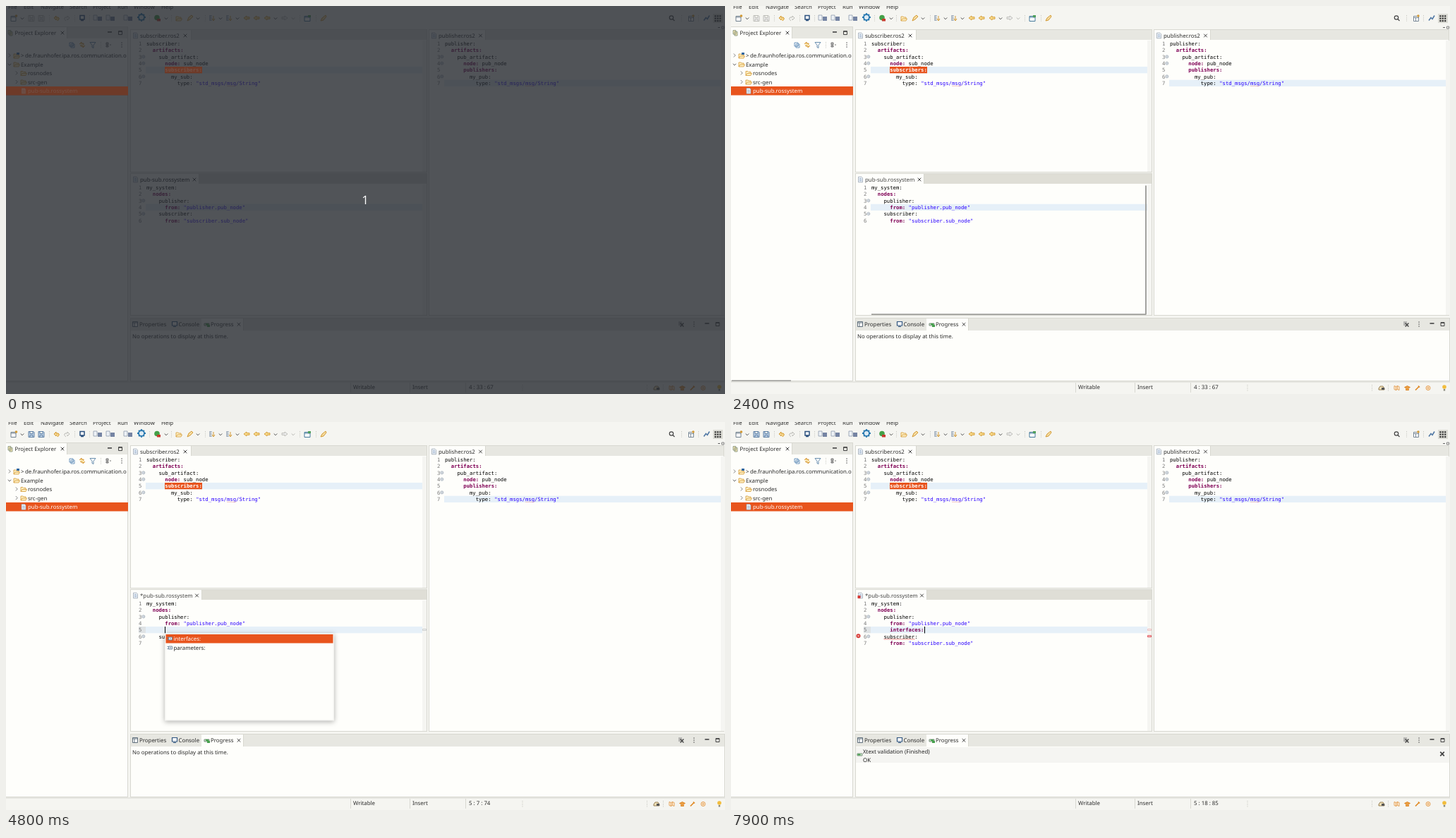
An HTML page with a canvas for the animation above (8 s loop, 1019 by 550 pixels).

```html
<!DOCTYPE html>
<html lang="en">
<head>
<meta charset="utf-8">
<title>Editor demo</title>
<style>
html, body { margin: 0; width: 100%; height: 100%; overflow: hidden; background: #f6f6f2; }
canvas { display: block; }
</style>
</head>
<body>
<canvas id="stage" width="1019" height="550"></canvas>
<script>
const ctx = document.getElementById('stage').getContext('2d');
const LOOP = 8000, CW = 4.385, LH = 9.33;
const UI = '7.87px "Noto Sans", "Open Sans", sans-serif';
const MONO = '7.285px "DejaVu Sans Mono", monospace';
const ORANGE = '#e8541d', PAPER = '#fefefb', BAR = '#f5f5f1', STRIP = '#e7e7e1';
const EDGE = '#d8d8d1', INK = '#2a2a2a', GOLD = '#d39a35', GREY = '#b9b9b4';
const HILITE = '#e6f0f8';
const KEYWORDS = /("[^"]*"|\b(?:artifacts|node|nodes|subscribers|publishers|from|interfaces):)/;

const artifact = (role, short) => [
  `${role}:`, '  artifacts:', `    ${short}_artifact:`, `      node: ${short}_node`,
  `      ${role}s:`, `        my_${short}:`, '          type: "std_msgs/msg/String"'];
const SUBSCRIBER = artifact('subscriber', 'sub');
const PUBLISHER = artifact('publisher', 'pub');
const SYSTEM = ['my_system:', '  nodes:', '    publisher:', '      from: "publisher.pub_node"',
  '    subscriber:', '      from: "subscriber.sub_node"'];

function rect(x, y, w, h, color) {
  ctx.fillStyle = color;
  ctx.fillRect(x, y, w, h);
}
function text(s, x, y, color = INK, font = UI, align = 'left') {
  ctx.font = font;
  ctx.fillStyle = color;
  ctx.textAlign = align;
  ctx.fillText(s, x, y);
}
// Path in coordinates relative to (x, y); stroked, and filled if a fill is given.
function icon(d, x, y, color = INK, fill, width = 1) {
  const p = new Path2D(d);
  ctx.save();
  ctx.translate(x, y);
  if (fill) { ctx.fillStyle = fill; ctx.fill(p); }
  ctx.strokeStyle = color;
  ctx.lineWidth = width;
  ctx.stroke(p);
  ctx.restore();
}
function disc(x, y, r, color) {
  ctx.fillStyle = color;
  ctx.beginPath();
  ctx.arc(x, y, r, 0, 7);
  ctx.fill();
}
const close = (x, y, r = 2.3, w = 1) =>
  icon(`M${-r} ${-r}L${r} ${r}M${r} ${-r}L${-r} ${r}`, x, y, '#444', null, w);
const chevron = (x, y, c = '#555') => icon('M-2.3-1L0 1.3L2.3-1', x, y, c);
const folder = (x, y) => icon('M-4 3V-3H-1L0-2H3V0M-4 3L-2 0H4.5L3 3Z', x, y, GOLD, '#fff0c4', .8);
const page = (x, y) => {
  icon('M-3-3.8H1.5L3-2.3V3.8H-3Z', x, y, '#8d9bab', '#f4f7fb', .7);
  icon('M-1.7-1.4H1.5M-1.7 .2H1.8M-1.7 1.8H1.8', x, y, '#6f8fb5', null, .6);
};
const dots = (x, y) => { for (const d of [-3, 0, 3]) rect(x - .6, y + d - .6, 1.3, 1.3, '#555'); };
const separator = (x, y) => { for (let i = -4; i < 5; i += 2.5) rect(x, y + i, 1, 1, '#c3c3bd'); };
const windowButtons = (x, y, gap) => {
  rect(x - 3, y - 2, 6, 1.8, '#555');
  icon('M-2.5-2.5H2.5V2.5H-2.5ZM-2.5-1.7H2.5', x + gap, y, '#444');
};
const arrow = (x, y, dir, c, fill) =>
  icon(`M${-4 * dir} 0L0-3V-1.3H${4 * dir}V1.3H0V3Z`, x, y, c, fill, .9);
const disk = (x, active) =>
  icon('M-4-4H3L4-3V4H-4ZM-2-4V-1H2V-4M-2 4V1H2V4', x, 17.5, active ? '#54789f' : GREY, active ? '#c5d7ea' : '#eee', .9);

function frame(x, y, w, h, stripH, tabX, tabW, strip = STRIP) {
  rect(x, y, w, h, PAPER);
  rect(x, y, w, stripH, strip);
  rect(tabX, y, tabW, stripH + 1, PAPER);
  ctx.strokeStyle = EDGE;
  ctx.lineWidth = 1;
  ctx.strokeRect(x - .5, y - .5, w, h);
  rect(tabX + tabW, y, 1, stripH, EDGE);
}

function toolbar(dirty) {
  rect(0, 0, 1019, 29, BAR);
  [['File', 3], ['Edit', 25], ['Navigate', 49], ['Search', 90], ['Project', 123], ['Run', 158],
    ['Window', 181], ['Help', 220]].forEach(([s, x]) => text(s, x, 4.2));
  icon('M-4-3H3V4H-4ZM-4-1.5H3', 11, 17.5, '#6f7f8d', '#fff');
  disc(14.5, 14, 1.8, GOLD);
  disk(36, dirty);
  disk(50, dirty);
  icon('M-4 0L-1-3V-1H2Q5 1 1 4M-4 0L-1 3V1', 72, 17, GOLD, '#f4d387');
  icon('M4 0L1-3V-1H-2Q-5 1-1 4M4 0L1 3V1', 86, 17, GREY);
  icon('M-3-3.5H3V2H-3ZM-2 3.5H2', 108, 17, '#2d527f', '#fff', 1.5);
  for (const x of [127, 145, 170]) icon('M-3-4H2V3H-3Z', x, 17, '#8d9bab', '#eef2f7', .8);
  for (const x of [131, 149, 174]) rect(x - 1, 15, 6, 6, '#7584a3');
  icon('M-4 0H-6M4 0H6M0-4V-6M0 4V6M-3-3L-4-4M3-3L4-4M-3 3L-4 4M3 3L4 4M-4 0A4 4 0 1 0 4 0A4 4 0 1 0-4 0',
    192, 16, '#2878b0', '#dceaf3', 1.8);
  disc(214, 16.5, 3.8, '#44a048');
  rect(214, 18, 5, 3.5, '#c8382c');
  folder(245, 18);
  icon('M-4 4L-2-1L2-4L4-2L0 2Z', 261, 17, GOLD, '#f5dca0');
  for (const x of [292, 316]) {
    icon('M-3-4V4M-3-3H0M-3 0H0M-3 3H0', x, 17, '#7e91a8');
    icon('M2-3V3M0 1L2 4L4 1', x, 17, GOLD);
  }
  arrow(341, 17, 1, GOLD, '#f9dc8c');
  arrow(355, 17, 1, GOLD, '#f9dc8c');
  arrow(370, 17, 1, GOLD, '#f9dc8c');
  arrow(395, 17, -1, GREY, '#eee');
  icon('M-4-3H4V4H-4ZM-4-1.5H4', 427, 17.5, '#45799a', '#fff');
  rect(428, 13, 4, 3, '#50a05b');
  icon('M-4 4L-2 0L3-4L4-2L0 3Z', 450, 17, GOLD, '#f5dca0');
  for (const x of [23, 227, 272, 304, 328, 382]) chevron(x, 17.5);
  chevron(407, 17.5, GREY);
  for (const x of [61, 97, 118, 203, 234, 282, 416, 439, 957, 981]) separator(x, 17);
  icon('M2.2 0A2.7 2.7 0 1 1-3.2 0A2.7 2.7 0 1 1 2.2 0M1.5 2L4 4.5', 943.5, 16.5, '#444', null, 1.2);
  icon('M-3-3H4V4H-3ZM-3-1H4M0-1V4', 970.5, 17.5, '#6c7d8d', '#fff', .9);
  disc(974, 14, 1.7, GOLD);
  icon('M-4 3L-1-1L1 1L4-4', 993, 17.5, '#5279a5', null, 1.6);
  rect(1002, 11, 14, 13, '#dcdcd5');
  for (let i = 0; i < 9; i++) rect(1004.3 + i % 3 * 3.4, 13.2 + (i / 3 | 0) * 3.4, 2.2, 2.2, '#333');
}

function explorer() {
  frame(0, 30, 173, 502, 16, 0, 86);
  icon('M-3-3.5H1V2H-3ZM-1-1.5H3V4H-1Z', 6, 38, '#8c9a86', '#f6e4ad', .9);
  text('Project Explorer', 12.5, 40.7);
  close(80, 38);
  windowButtons(147, 38, 15);
  icon('M-3-3H2V2H-3ZM-1-1H4V4H-1ZM0 1.5H3', 93, 55, '#5b89b5', '#fff', .9);
  icon('M-4-1L-1-4V-2H2V0M4 1L1 4V2H-2V0', 108, 55, '#cf8b26', '#f9dc8c', .9);
  icon('M-4-4H4L1 0V4L-1 3V0Z', 123, 55.5, '#5a83a5', '#fff', .9);
  separator(134, 55);
  icon('M-3-3H0V0H-3ZM-3 1H0V3H-3ZM2 0H4', 145, 55, '#777', '#bbb');
  dots(164, 55);
  rect(0, 114, 173, 12.5, ORANGE);
  const side = (x, y) => icon('M-1.2-2.5L1.3 0L-1.2 2.5', x, y, '#666', null, .8);
  side(5, 70); side(15, 95); side(15, 107.6);
  chevron(5, 82.8, '#666');
  folder(15, 71); folder(15, 83); folder(25, 95.5); folder(25, 108);
  rect(15, 66, 4, 3, '#35699f');
  page(25, 120.4);
  ctx.save();
  ctx.beginPath();
  ctx.rect(0, 60, 172.5, 60);
  ctx.clip();
  text('>', 21, 73);
  text('de.fraunhofer.ipa.ros.communication.o', 27, 73);
  ctx.restore();
  text('Example', 21, 85.6);
  text('rosnodes', 31, 98.2);
  text('src-gen', 31, 110.7);
  text('pub-sub.rossystem', 31, 123.3, '#fff');
}

function codeLine(line, x, y) {
  let col = 0;
  for (const part of line.split(KEYWORDS)) {
    const quoted = part[0] === '"', key = !quoted && KEYWORDS.test(part);
    text(part, x + col * CW, y, quoted ? '#2a00ff' : key ? '#7f0055' : '#000', (key ? 'bold ' : '') + MONO);
    col += part.length;
  }
}
function squiggle(x, y, w, color = '#e0302a') {
  let d = 'M0 0';
  for (let i = 1; i <= w; i++) d += `L${i} ${i % 2 ? .9 : 0}`;
  icon(d, x, y, color, null, .6);
}
function editor(x, base, lines, folds, current, right) {
  const tx = x + 22;
  rect(tx - 1, base - 7.3 + (current - 1) * LH, right - tx + 1, LH, HILITE);
  lines.forEach((line, i) => {
    const y = base + i * LH;
    text(i + 1, x + 15.3, y, '#787878', MONO, 'right');
    if (folds.includes(i + 1)) {
      icon('M2 0A2 2 0 1 1-2 0A2 2 0 1 1 2 0M-1 0H1', x + 17.8, y - 2.8, '#8b98a6', '#f0f3f6', .7);
    }
    codeLine(line, tx, y);
  });
}

function topEditors() {
  frame(177, 34, 420, 202, 14, 177, 85);
  rect(590, 49, 6, 186, '#f5f5f2');
  page(183.5, 42);
  text('subscriber.ros2', 190, 44.8);
  close(254, 42);
  editor(177, 56, SUBSCRIBER, [3, 4, 6], 5, 590);
  rect(225, 86, 53, 9.3, ORANGE);
  text('subscribers:', 199 + 6 * CW, 56 + 4 * LH, '#fff', 'bold ' + MONO);
  squiggle(313, 113, 13, '#efa9a4');

  frame(600, 34, 418, 405, 14, 600, 79);
  rect(1013, 49, 5, 389, '#f5f5f2');
  page(606.5, 42);
  text('publisher.ros2', 613, 44.8);
  close(672.5, 42);
  editor(600, 56, PUBLISHER, [3, 4, 6], 7, 1013);
  squiggle(736, 113, 13, '#efa9a4');
  rect(1009, 30, 3, 1, '#666');
  icon('M-1.5-1.5H1.5V1.5H-1.5Z', 1016, 30.5, '#666', null, .8);
}

function systemEditor(t) {
  const dirty = t >= 4000, done = t >= 7000, error = t >= 7500;
  const lines = SYSTEM.slice();
  if (dirty) lines.splice(4, 0, done ? '      interfaces:' : '');
  frame(177, 238, 420, 201, 14, 177, dirty ? 100 : 96, '#dfded6');
  rect(590, 253, 6, 185, '#f5f5f2');
  page(183.5, 246);
  text((dirty ? '*' : '') + 'pub-sub.rossystem', 190, 248.8, t < 2400 ? '#111' : '#444');
  close(dirty ? 270.5 : 267, 246);
  if (dirty) rect(188, 290, 10, LH, '#dfe3e5');
  editor(177, 260, lines, dirty ? [3, 6] : [3, 5], dirty ? 5 : 4, 590);
  if (dirty) icon('M-2.5-1H2.5V1H-2.5Z', 593, 294.5, error ? '#efb6b6' : '#c5c8c8', '#f2f2f2', .8);
  if (error) {
    rect(179.5, 246, 4, 4, '#d63a35');
    disc(180.5, 303.3, 3, '#d63a35');
    icon('M-1.1-1.1L1.1 1.1M1.1-1.1L-1.1 1.1', 180.5, 303.3, '#fff', null, .8);
    squiggle(216.5, 307.5, 44);
    icon('M-2.5-1H2.5V1H-2.5Z', 593, 303.7, '#e04850', '#f8cfd0', .9);
  }
  const caretOn = t >= 3400 && t < 5200 || t >= 5800 && t < 6400 || done;
  if (caretOn) {
    const col = done ? 17 : dirty ? 6 : 32;
    rect(Math.round(199 + col * CW), dirty ? 290 : 280, 1, 9.5, '#000');
  }
}

function popup() {
  ctx.save();
  ctx.shadowColor = 'rgba(0,0,0,.32)';
  ctx.shadowBlur = 7;
  ctx.shadowOffsetY = 1.5;
  rect(225, 299.5, 240, 124, '#f4f4f1');
  ctx.restore();
  rect(226.5, 301, 237, 121, PAPER);
  rect(226.5, 301, 237, 12.5, ORANGE);
  ['interfaces:', 'parameters:'].forEach((s, i) => {
    const y = 307 + i * 13;
    icon('M-1.5-2H3.5V2H-1.5ZM-3.5-1.5H-1.5M-3.5 1.5H-1.5M0 0H2', 232, y, '#667f9a', '#edf2f6', .9);
    text(s, 237.5, y + 3, i ? '#222' : '#fff');
  });
}

function bottomPanel(finished) {
  frame(177, 443, 842, 89, 17, 277, 59);
  icon('M-3.5-3.5H3.5V3.5H-3.5ZM-3.5-2H3.5M-1-2V3.5', 183, 451, '#50606f', '#fff', .9);
  icon('M-3.5-3.5H3.5V2H-3.5ZM-2 3.5H2', 239, 451, '#2f547f', '#fff', 1.2);
  icon('M-4-1H3V2H-4Z', 285, 451, '#66806b', '#d7ead5', .9);
  rect(283, 450, 4, 2, '#45a04c');
  rect(285, 452, 4, 3, '#45a04c');
  text('Properties', 189, 453.8);
  text('Console', 244.5, 453.8);
  text('Progress', 290, 453.8);
  close(330, 451.3);
  icon('M-3-3H2M-3-1H2M-3 1H0', 956, 451, '#888');
  close(958, 452, 2.4, 1.4);
  dots(975, 451);
  windowButtons(993.5, 451, 15);
  if (finished) {
    rect(177, 461, 841, 22, '#f5f5f2');
    icon('M-3.5-1.5H3.5V1.5H-3.5Z', 182.5, 471.5, '#66806b', '#d7ead5', .8);
    rect(179.5, 470.5, 4, 2, '#45a04c');
    text('Xtext validation (Finished)', 187, 470.3, '#222');
    text('OK', 187, 481.5, '#222');
    close(1008, 470.5, 2.8, 1.7);
  } else {
    text('No operations to display at this time.', 179, 470.6);
  }
}

function statusBar(position) {
  rect(0, 533, 1019, 17, BAR);
  rect(0, 532.5, 1019, 1, EDGE);
  for (const x of [488, 572, 651]) rect(x, 534, 1, 14, EDGE);
  separator(731.5, 541);
  separator(908, 541);
  separator(931, 541);
  text('Writable', 492, 543.4);
  text('Insert', 576, 543.4);
  text(position, 656, 543.4);
  icon('M-4 1L-2-2H2L4 1V3H-4Z', 922, 541, '#8d7448', '#f0dfb5', .9);
  rect(922, 541, 4, 3, '#555');
  icon('M-3.5-3L-1-2L1-3L3.5-2V3L1 2L-1 3L-3.5 2ZM-1-2V3M1-3V2', 943.5, 541.5, '#dc8c36', '#fff3df', .8);
  icon('M-4-1L0-3L4-1L0 1ZM-2 1V3H2V1', 958.5, 541.5, '#dc8220', '#eca044', .9);
  icon('M-3 3L2-2M1-3L3-1', 973, 541.5, '#e08a25', null, 1.7);
  icon('M3 0A3 3 0 1 1-3 0A3 3 0 1 1 3 0M1 0A1 1 0 1 1-1 0A1 1 0 1 1 1 0', 988, 541.5, '#e29a4d', '#fff3df', 1);
  disc(1011, 540, 2.8, '#f2bd3d');
  rect(1009.8, 543, 2.4, 2.5, '#8c8c80');
}

function scrollbars(t) {
  const steps = (from, n) => Math.min(n, Math.max(0, Math.floor((t - from) / 100) + 1)) / n;
  const first = steps(1600, 4) - steps(3600, 3);
  const both = first + steps(5500, 4) - steps(7500, 3);
  ctx.globalAlpha = Math.max(0, first);
  rect(1, 530.3, 84, 1.7, '#a2a29e');
  ctx.globalAlpha = Math.max(0, both);
  rect(587, 254.5, 2, 183, '#a2a29e');
  rect(199, 436.2, 389, 1.8, '#a2a29e');
  ctx.globalAlpha = 1;
}

function countdown() {
  const glow = 'rgba(190,78,32,.3)';
  rect(0, 0, 1019, 550, 'rgba(38,42,48,.8)');
  rect(0, 114, 173, 12.5, glow);
  rect(225, 86, 53, 9.3, glow);
  text('1', 509, 281, '#fff', '17px "Open Sans", "Noto Sans", sans-serif', 'center');
}

function draw() {
  const t = performance.now() % LOOP;
  ctx.textRendering = 'geometricPrecision';
  rect(0, 0, 1019, 550, BAR);
  toolbar(t >= 4000);
  explorer();
  topEditors();
  systemEditor(t);
  bottomPanel(t >= 4700 && t < 4800 || t >= 7900);
  statusBar(t < 4000 ? '4 : 33 : 67' : t < 7000 ? '5 : 7 : 74' : '5 : 18 : 85');
  scrollbars(t);
  if (t >= 4700 && t < 7000) popup();
  if (t < 100) countdown();
  requestAnimationFrame(draw);
}
draw();
</script>
</body>
</html>
```
